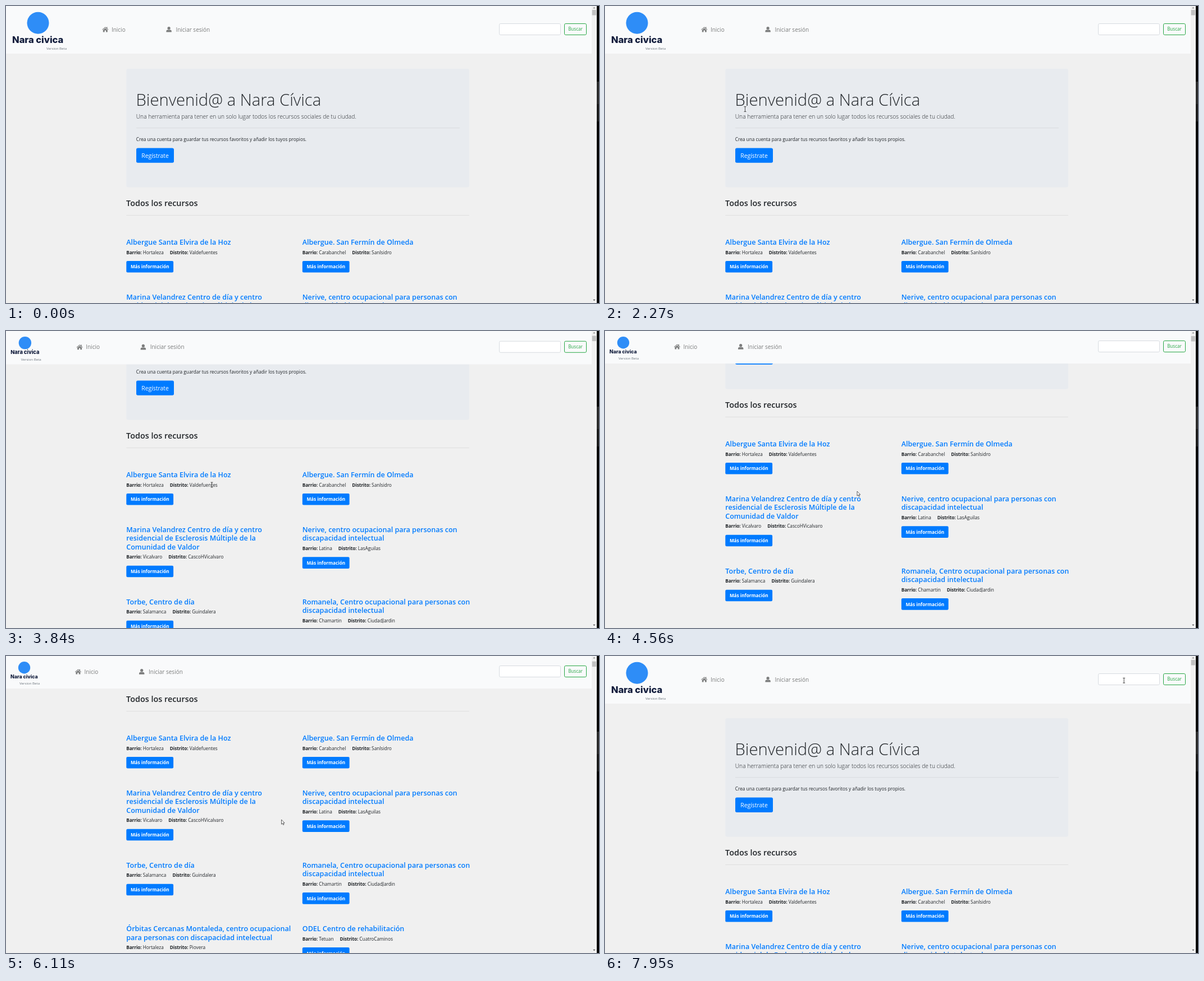
These frames come from a looping animation (1056x530 px, 8000 ms). An HTML page:

```html
<!DOCTYPE html>
<html lang="es">
<head>
<meta charset="utf-8">
<title>Nara Cívica</title>
<style>
html, body { margin: 0; width: 100%; height: 100%; overflow: hidden; background: #f0f0f0; }
svg { display: block; width: 1056px; height: 530px; font-family: "Open Sans", "Noto Sans", sans-serif; fill: #212529; }
text { white-space: pre; }
.display { font-size: 29.2px; font-weight: 300; }
.lead { font-size: 10.2px; font-weight: 300; }
.body { font-size: 8.26px; }
.body tspan { font-weight: 700; letter-spacing: -.1px; }
.heading { font-size: 14.4px; font-weight: 600; }
.title { font-size: 12.5px; font-weight: 600; fill: #007bff; }
.more { font-size: 8.2px; font-weight: 700; fill: #fff; text-anchor: middle; }
.join { font-size: 10.4px; fill: #fff; text-anchor: middle; }
.nav { font-size: 10px; }
.brand { font: 800 16.5px Inter, "Open Sans", sans-serif; fill: #101b3b; }
.beta { font-size: 6.15px; fill: #6c757d; }
.search { font-size: 8.1px; text-anchor: middle; }
</style>
</head>
<body>
<svg id="stage" viewBox="0 0 1056 530" xmlns="http://www.w3.org/2000/svg"></svg>
<script>
const LOOP = 8000;
const BLUE = '#007bff', GREEN = '#28a745';
const LINE = 15.4, ROW = 98, COLUMN = 313.5, LEFT = 214.3;

const text = (x, y, cls, s, extra = '') => `<text x="${x}" y="${y}" class="${cls}" ${extra}>${s}</text>`;
const rect = (x, y, w, h, fill, r = 0, extra = '') =>
  `<rect x="${x}" y="${y}" width="${w}" height="${h}" rx="${r}" fill="${fill}" ${extra}/>`;

// Cards in reading order: title (lines split by |), barrio, distrito
const cards = [
  ['Albergue Santa Elvira de la Hoz', 'Hortaleza', 'Valdefuentes'],
  ['Albergue. San Fermín de Olmeda', 'Carabanchel', 'SanIsidro'],
  ['Marina Velandrez Centro de día y centro|residencial de Esclerosis Múltiple de la|Comunidad de Valdor', 'Vicalvaro', 'CascoHVicalvaro'],
  ['Nerive, centro ocupacional para personas con|discapacidad intelectual', 'Latina', 'LasAguilas'],
  ['Torbe, Centro de día', 'Salamanca', 'Guindalera'],
  ['Romanela, Centro ocupacional para personas con|discapacidad intelectual', 'Chamartin', 'CiudadJardin'],
  ['Órbitas Cercanas Montaleda, centro ocupacional|para personas con discapacidad intelectual', 'Hortaleza', 'Piovera'],
  ['ODEL Centro de rehabilitación', 'Tetuan', 'CuatroCaminos']
].map(([title, ...place]) => [title.split('|'), ...place]);

function card(x, y, [lines, barrio, distrito]) {
  const end = y + (lines.length - 1) * LINE;
  return lines.map((s, i) => text(x, y + 4.4 + i * LINE, 'title', s)).join('') +
    text(x, end + 21, 'body', `<tspan>Barrio:</tspan> ${barrio}<tspan dx="11">Distrito:</tspan> ${distrito}`) +
    rect(x, end + 33.4, 83.8, 20.6, BLUE, 2.2) +
    text(x + 42, end + 46.8, 'more', 'Más información');
}

// Two columns; the taller card of a pair sets the row height
function grid(y) {
  let out = '';
  for (let i = 0; i < cards.length; i += 2) {
    const pair = cards.slice(i, i + 2);
    pair.forEach((c, col) => out += card(LEFT + col * COLUMN, y, c));
    y += ROW + (Math.max(...pair.map(c => c[0].length)) - 1) * LINE;
  }
  return out;
}

const page =
  rect(LEFT, 112, 610.5, 211.5, '#e8ebef', 3) +
  text(231.5, 178, 'display', 'Bienvenid@ a Nara Cívica') +
  text(231.8, 200.7, 'lead', 'Una herramienta para tener en un solo lugar todos los recursos sociales de tu ciudad.') +
  rect(232, 217.4, 576, .7, '#d2d5d8') +
  text(231.8, 241.4, 'body', 'Crea una cuenta para guardar tus recursos favoritos y añadir los tuyos propios.') +
  rect(232, 253.5, 67, 26.3, BLUE, 2.7) +
  text(265.5, 270.8, 'join', 'Regístrate') +
  text(214, 356.5, 'heading', 'Todos los recursos') +
  rect(LEFT, 373, 610.5, .7, '#d8d8d8') +
  grid(421.5);

const header =
  rect(0, 0, 1043, 85, '#f9fafb', 0, 'id="bar"') +
  '<circle id="mark" fill="#2e8df7"/>' +
  `<g id="brand">${text(0, 0, 'brand', 'Nara civica')}</g>` +
  `<g id="beta">${text(0, 0, 'beta', 'Version Beta')}</g>` +
  `<g id="nav" fill="#7c7d7d">
    <path d="M0 .3L5.6 -4.6L7.7 -2.8V-4.2H9.2V-1.5L11.2 .3L10.6 1L5.6 -3.3L.6 1Z"/>
    <path d="M1.6 1.1L5.6 -2.3L9.6 1.1V4.6H6.8V1.8H4.4V4.6H1.6Z"/>
    ${text(16.7, 3.7, 'nav', 'Inicio')}
    <circle cx="118.9" cy="-2.3" r="2.6"/>
    <path d="M114.2 4.8V3.3Q114.2 .8 116.8 .8H121Q123.6 .8 123.6 3.3V4.8Z"/>
    ${text(131.2, 3.7, 'nav', 'Iniciar sesión')}
  </g>` +
  `<g id="search">
    ${rect(878.5, -10, 109, 20, '#fff', 2.2, 'stroke="#ced4da" stroke-width=".8"')}
    ${rect(994.5, -10, 39, 20, 'none', 2.2, `id="button" stroke="${GREEN}"`)}
    ${text(1014, 2.9, 'search', 'Buscar', 'id="label"')}
  </g>`;

const edge =
  rect(1043, 0, 9, 530, '#f1f1f1') +
  rect(1043.7, 7, 7.4, 9.5, '#c1c1c1', 0, 'id="thumb"') +
  '<path d="M1045.3 4.2L1047.4 2L1049.5 4.2Z" fill="#888"/>' +
  '<path d="M1045.3 523.8L1047.4 526L1049.5 523.8Z" fill="#505050"/>' +
  rect(1052, 0, 4, 530, '#000') +
  rect(1052, 135, 4, 40, '#2b2b2b') +
  rect(1052, 175, 4, 31, '#1b1b1b');

const pointer = `<g id="cursor">
  <path id="arrow" d="M0 0V8.2L1.9 6.5L3.2 9.4L4.5 8.8L3.2 6H5.7Z" fill="#fff" stroke="#222" stroke-width=".7"/>
  <path id="beam" d="M-2 -4.4H2M0 -4.4V4.4M-2 4.4H2" fill="none" stroke="#222" stroke-width=".8"/>
</g>`;

document.getElementById('stage').innerHTML =
  rect(0, 0, 1056, 530, '#f0f0f0') + `<g id="page">${page}</g>` + header + edge + pointer;

const $ = Object.fromEntries([...document.querySelectorAll('[id]')].map(e => [e.id, e]));
const set = (el, attrs) => { for (const k in attrs) el.setAttribute(k, attrs[k]); };
const move = (el, x, y, s = 1) => el.setAttribute('transform', `translate(${x} ${y}) scale(${s})`);

// Eased progress 0..1 of a change that begins at start and takes span ms
function progress(t, start, span) {
  const u = Math.min(1, Math.max(0, (t - start) / span));
  return u * u * (3 - 2 * u);
}
const easeOut = (t, start, span) => 1 - (1 - Math.min(1, Math.max(0, (t - start) / span))) ** 2.4;

// Every wheel notch scrolls the page by the same distance
const NOTCH = 55;
const notchesDown = [2560, 3300, 3550, 4130, 4690];
const notchesUp = notchesDown.map((_, i) => 7071 + 132 * i);
const turned = (t, notches, span) => notches.reduce((sum, start) => sum + progress(t, start, span), 0);
const scrollAt = t => NOTCH * (turned(t, notchesDown, 270) - turned(t, notchesUp, 380));

// Header size: 1 at the top of the page, 0 once scrolled
const headerAt = t => 1 - easeOut(t, 3560, 400) + easeOut(t, 7500, 380);

// Cursor moves: start, duration, destination
const home = [1031, 521];
const moves = [
  [680, 550, 211, 111], [1400, 220, 196, 78], [1950, 310, 249.5, 184],
  [3310, 390, 366.5, 274.5], [4140, 310, 449, 286], [4700, 600, 490.5, 292],
  [6110, 740, 1010, 20], [6940, 290, 890, 123.7], [7680, 260, 924.2, 43.7]
];
const cursorAt = t => moves.reduce(([x, y], [start, span, toX, toY]) => {
  const p = progress(t, start, span);
  return [x + (toX - x) * p, y + (toY - y) * p];
}, home);

function draw(t) {
  const scroll = scrollAt(t), k = headerAt(t);
  move($.page, 0, -scroll);
  $.thumb.setAttribute('y', 7 + scroll * .0095);

  set($.bar, { height: 58 + 27 * k });
  set($.mark, { cx: 32.5 + 24.5 * k, cy: 20.7 + 9.5 * k, r: 10.7 + 8.8 * k });
  move($.brand, 8 + 3 * k, 40 + 26 * k, .535 + .465 * k);
  move($.beta, 24 + 48 * k, 51 + 27 * k);
  move($.nav, 122.8 + 48.4 * k, 28 + 13.8 * k);
  move($.search, 0, 27.5 + 14 * k);

  const [x, y] = cursorAt(t);
  const hover = x > 994 && y < 38;
  set($.button, { fill: hover ? GREEN : 'none' });
  set($.label, { fill: hover ? '#fff' : GREEN });

  const beam = (t >= 2150 && t < 4200) || t >= 7850;
  move($.cursor, x, y);
  set($.cursor, { visibility: t < 380 ? 'hidden' : 'visible' });
  set($.arrow, { display: beam ? 'none' : 'inline' });
  set($.beam, { display: beam ? 'inline' : 'none' });
}

const start = performance.now();
function tick() {
  const t = (performance.now() - start) % LOOP;
  draw(Math.floor(t / 10) * 10);
  requestAnimationFrame(tick);
}
tick();
</script>
</body>
</html>
```
